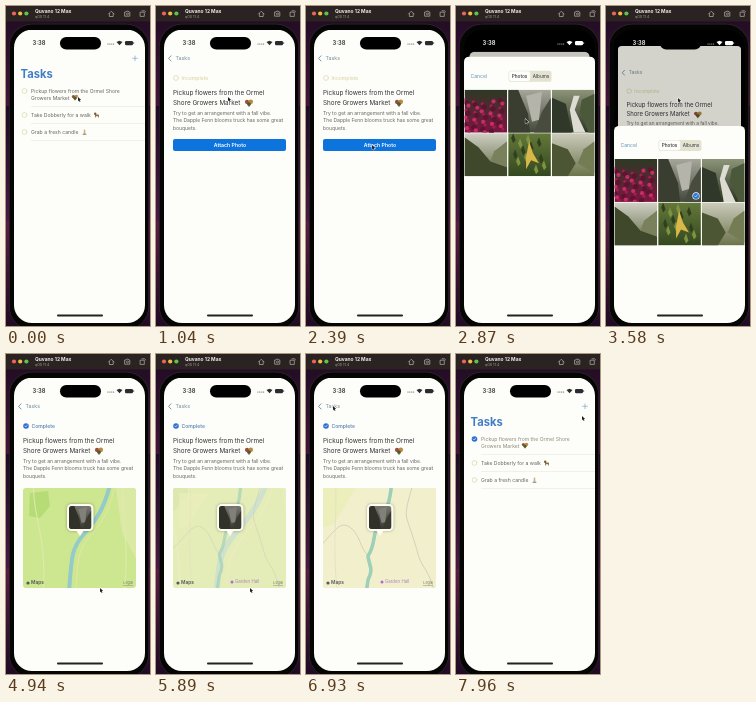
Recreate the animation shown at these times as an HTML page with a canvas. Size 144 by 320 pixels, loop 8 s.

```html
<!DOCTYPE html>
<html lang="en">
<head>
<meta charset="utf-8">
<style>
html, body { margin: 0; width: 100%; height: 100%; overflow: hidden; background: #000; }
canvas { display: block; width: 144px; height: 320px; }
</style>
</head>
<body>
<canvas></canvas>
<script>
const LOOP = 8000;
const PAPER = '#fdfdf9', BLUE = '#0c74dc', PALE = '#d4d29c', INK = '#34343a', GREY = '#66665e';
const canvas = document.querySelector('canvas');
const c = canvas.getContext('2d');
const dpr = window.devicePixelRatio || 1;
canvas.width = 144 * dpr;
canvas.height = 320 * dpr;

const clamp = x => Math.max(0, Math.min(1, x));
const mix = (a, b, k) => a + (b - a) * k;
const easeOut = x => 1 - (1 - clamp(x)) ** 3;
const smooth = x => (x = clamp(x), x * x * (3 - 2 * x));

function group(draw) { c.save(); draw(); c.restore(); }
function path(x, y, w, h, r = 0) { c.beginPath(); c.roundRect(x, y, w, h, r); }
function box(x, y, w, h, color, r) { path(x, y, w, h, r); c.fillStyle = color; c.fill(); }
function dot(x, y, r, color) { c.beginPath(); c.arc(x, y, r, 0, 7); c.fillStyle = color; c.fill(); }
function ring(x, y, r, color) { c.beginPath(); c.arc(x, y, r, 0, 7); c.strokeStyle = color; c.lineWidth = .6; c.stroke(); }
function poly(points, color) {
  c.beginPath();
  points.forEach(p => c.lineTo(...p));
  c.fillStyle = color;
  c.fill();
}
function stroke(d, color, width) {
  c.strokeStyle = color;
  c.lineWidth = width;
  c.lineCap = c.lineJoin = 'round';
  c.stroke(new Path2D(d));
}
function text(s, x, y, size, color, weight = 400, align = 'left') {
  c.font = `${weight} ${size}px Inter, sans-serif`;
  c.textAlign = align;
  c.textBaseline = 'middle';
  c.fillStyle = color;
  c.fillText(s, x, y);
}
function fade(x, y, w, h, top, bottom) {
  const g = c.createLinearGradient(0, y, 0, y + h);
  g.addColorStop(0, top);
  g.addColorStop(1, bottom);
  c.fillStyle = g;
  c.fillRect(x, y, w, h);
}

function bouquet(x, y, size) {
  group(() => {
    c.translate(x, y);
    c.scale(size, size);
    poly([[-2, 0], [2, 0], [0, 3]], '#8a7a4c');
    dot(-1.4, -.8, 1.5, '#a04a40');
    dot(1.3, -.9, 1.6, '#b88c3c');
    dot(0, .7, 1.3, '#4c5c34');
  });
}
function dog(x, y) {
  box(x - 2, y - .6, 4, 1.8, '#8c6c44', .8);
  box(x - 1.8, y + .6, .8, 2, '#8c6c44');
  box(x + 1, y + .6, .8, 2, '#8c6c44');
  dot(x - 1.8, y - 1.2, 1.2, '#74583a');
}
function candle(x, y) {
  box(x - .8, y - 1, 1.6, 3, '#bcb49c');
  dot(x, y - 1.8, .8, '#dca03c');
  box(x - 2, y + 1.8, 4, .9, '#8c7c5c', .4);
}
function check(x, y, done) {
  if (!done) return ring(x, y, 2.4, PALE);
  dot(x, y, 2.8, '#2f6fd0');
  stroke(`M${x - 1.2} ${y}l.9 1 1.6-2`, '#fff', .6);
}

function listPage(done) {
  box(8, 24, 131, 293, PAPER);
  stroke('M129 50v4.6M126.7 52.3h4.6', '#6c96c4', .6);
  text('Tasks', 14.5, 68.5, 11.2, '#3e7ec4', 700);
  check(18.5, 85, done);
  const first = done ? '#8c8a78' : GREY;
  text('Pickup flowers from the Ormel Shore', 25, 85, 5.1, first);
  text('Growers Market', 25, 92, 5.1, first);
  bouquet(69, 91.5, 1.1);
  check(18.5, 109, false);
  text('Take Dobberly for a walk', 25, 109, 5.1, GREY);
  dog(91, 109);
  check(18.5, 126, false);
  text('Grab a fresh candle', 25, 126, 5.1, GREY);
  candle(78.5, 126);
  for (const y of [100, 117.5, 134.5]) box(25, y, 114, .4, '#e8e6d2');
}

function photo(kind, x, y, w, h) {
  group(() => {
    path(x, y, w, h);
    c.clip();
    c.translate(x, y);
    c.scale(w / 43, h / 43);
    [
      () => {
        fade(0, 0, 43, 43, '#2c3a24', '#7c1440');
        for (let i = 0; i < 46; i++)
          dot(i * 17.3 % 43, 10 + i * 11.7 % 33, 1.6 + i % 3 * .5, ['#a81c50', '#c82c68', '#5c1430'][i % 3]);
      },
      () => {
        fade(0, 0, 43, 43, '#a6a69a', '#44483c');
        poly([[0, 0], [10, 0], [20, 24], [22, 43], [0, 43]], '#3a3e30');
        poly([[18, 6], [34, 2], [31, 30], [24, 32]], '#b4b4aa');
        poly([[43, 8], [34, 22], [26, 43], [43, 43]], '#484c3e');
      },
      () => {
        fade(0, 0, 43, 43, '#8c9478', '#2c3424');
        poly([[0, 8], [14, 14], [20, 43], [0, 43]], '#30382a');
        poly([[22, 6], [28, 6], [23, 20], [34, 43], [22, 43], [18, 20]], '#dcdcd2');
        poly([[30, 10], [43, 4], [43, 43], [37, 43], [28, 22]], '#4c583a');
      },
      () => {
        fade(0, 0, 43, 43, '#d0d0c4', '#5c6640');
        poly([[0, 4], [14, 14], [26, 28], [43, 34], [43, 43], [0, 43]], '#40482c');
        poly([[43, 8], [30, 18], [26, 28], [43, 34]], '#78805c');
      },
      () => {
        fade(0, 0, 43, 43, '#64783a', '#344820');
        for (let i = 0; i < 12; i++) {
          const px = 5 + i * 13 % 34, py = 5 + i * 19 % 34;
          poly([[px, py - 5], [px + 2.5, py + 2], [px, py + 5], [px - 2, py]], i % 2 ? '#7e9440' : '#2e4020');
        }
        poly([[21, 8], [25, 20], [31, 30], [23, 27], [18, 36], [18, 24]], '#d8b848');
      },
      () => {
        fade(0, 0, 43, 43, '#ccccbc', '#6c744c');
        poly([[0, 10], [16, 16], [24, 30], [16, 43], [0, 43]], '#4c5634');
        poly([[43, 8], [32, 16], [26, 30], [43, 40]], '#747c54');
      }
    ][kind]();
  });
}

// River and roads are laid out around the pin, which stays put while zooming.
function map(zoom) {
  group(() => {
    path(17, 134, 113, 100, 3);
    c.clip();
    const layer = (alpha, scale, draw) => group(() => {
      c.globalAlpha = alpha;
      c.translate(74, 182);
      c.scale(scale, scale);
      c.translate(-74, -182);
      draw();
    });
    layer(1, 1 + zoom * .6, () => {
      box(-20, 90, 200, 190, '#cde690');
      poly([[24, 139], [42, 137], [44, 152], [34, 164], [23, 162]], '#b6dc78');
      poly([[110, 134], [130, 134], [130, 205], [116, 178]], '#daeaa4');
      stroke('M28 120C24 165 44 180 36 250M118 120C112 160 127 190 116 250', '#e0eaae', 1);
      stroke('M107 118C100 152 92 164 78 180S66 204 62 250', '#94cac8', 4);
      stroke('M111 120C105 155 98 166 84 182S72 210 69 250', '#e6e6a8', .9);
    });
    if (zoom) layer(zoom, .7 + zoom * .3, () => {
      box(-30, 80, 220, 210, '#f2f0cc');
      poly([[17, 134], [50, 134], [28, 170], [17, 174]], '#eceebc');
      stroke('M112 110C105 140 98 155 101 165S108 185 112 200 124 215 130 245M5 199C22 190 30 166 42 172S54 196 62 201', '#c6c3b0', .7);
      stroke('M28 110C34 160 23 190 34 255', '#e0dcc0', .7);
      stroke('M86 110C87 150 78 160 72 171S70 190 62 202C63 212 68 214 62 226L58 255', '#9ed0b8', 3.6);
    });
    if (zoom > .5) {
      dot(76, 228, 1.5, '#b06cc8');
      text('Garden Hall', 79, 228, 4.4, '#b080bc');
    }
    dot(22, 229, 1.6, '#55585a');
    text('Maps', 25, 229, 4.8, '#55585a', 600);
    text('Legal', 127, 229, 3.8, '#7c7e70', 400, 'right');
    box(117, 231, 10, .4, '#8c8e7c');
  });
  group(() => {
    c.shadowColor = '#0005';
    c.shadowBlur = 3 * dpr;
    box(61, 150, 26.5, 27, '#fffdf2', 4.5);
  });
  poly([[70, 176], [78, 176], [74, 182]], '#fffdf2');
  group(() => {
    path(63, 152, 22.5, 23, 3);
    c.clip();
    photo(1, 63, 152, 22.5, 23);
    box(63, 152, 22.5, 23, '#1c181855');
  });
}

function detailPage(done, zoom) {
  box(8, 24, 131, 293, PAPER);
  stroke('M15 49.8l-2.4 2.6 2.4 2.6', '#5c7c9c', .8);
  text('Tasks', 19.5, 52.5, 5.3, '#7a8e9c');
  check(20, 72, done);
  text(done ? 'Complete' : 'Incomplete', 25.5, 72, 5.1, done ? '#4c7cac' : PALE, done ? 500 : 400);
  text('Pickup flowers from the Ormel', 17, 87.3, 6.35, INK);
  text('Shore Growers Market', 17, 97, 6.35, INK);
  bouquet(93, 97, 1.4);
  text('Try to get an arrangement with a fall vibe.', 17, 107, 5, GREY);
  text('The Dapple Fenn blooms truck has some great', 17, 114.5, 5, GREY);
  text('bouquets.', 17, 122, 5, GREY);
  if (done) return map(zoom);
  box(17, 133, 113, 12, BLUE, 2);
  text('Attach Photo', 74, 139.2, 5.2, '#fff', 600, 'center');
}

function sheet(top, picked) {
  group(() => {
    c.translate(0, top);
    box(8, 0, 131, 300, PAPER, [5, 5, 0, 0]);
    text('Cancel', 14.5, 19.5, 5.1, '#5c94bc');
    box(52.5, 14, 43, 11, '#e4e3d2', 2.5);
    box(53.2, 14.7, 21, 9.6, PAPER, 2);
    text('Photos', 63.5, 19.6, 4.7, INK, 500, 'center');
    text('Albums', 85, 19.6, 4.7, INK, 400, 'center');
    for (let i = 0; i < 6; i++) photo(i, 8.5 + i % 3 * 43.7, i < 3 ? 33 : 76.5, 42.7, 43);
    if (picked) {
      dot(90, 70, 3.6, '#fff');
      dot(90, 70, 3, '#2a74d4');
      stroke('M88.7 70l1 1.1 1.7-2.2', '#fff', .6);
    }
  });
}

function statusBar(color) {
  text('3:38', 33, 37.3, 5.8, color, 600, 'center');
  for (let i = 0; i < 4; i++) dot(102 + i * 1.9, 38, .5, color);
  poly([[110.5, 36], [113.5, 34.8], [116.5, 36], [113.5, 39.3]], color);
  box(119, 35, 8, 4.2, color, 1.2);
  box(127.4, 36.3, .7, 1.6, color);
  box(54, 31, 41, 12.5, '#000', 6.3);
}

function chrome() {
  fade(0, 0, 144, 100, '#1c0c20', '#48123e');
  fade(0, 100, 144, 115, '#1e0a26', '#4c1846');
  fade(0, 215, 144, 105, '#5c1c40', '#200a24');
  box(0, 0, 144, 15.5, '#2a2322');
  ['#ee6459', '#f2bb40', '#5dc250'].forEach((color, i) => dot(8 + i * 6.2, 7.5, 2.1, color));
  text('Quvano 12 Max', 29, 6, 4.9, '#efece6', 700);
  text('qOS 11.4', 29, 11.3, 3.5, '#a8a29c');
  stroke('M102.5 8l2.8-2.8 2.8 2.8M103.4 7.5v3h3.8v-3', '#b8b2ac', .7);
  stroke('M119 6h1l.6-.9h1.6l.6.9h1v4.2h-4.8z', '#b8b2ac', .7);
  ring(121.4, 8, 1, '#b8b2ac');
  stroke('M134.5 6.2h3.8v4.2h-3.8zM136 4.8h2.6l1 1', '#b8b2ac', .7);
  box(3, 17.8, 140, 306, '#2e282c', 23);
  box(3.7, 18.5, 138.6, 304.6, '#050504', 22);
}

const cursorStops = [[0, 72, 91], [1450, 72, 91], [2150, 66, 139], [2550, 66, 139], [3150, 72, 92],
  [3900, 72, 92], [4700, 94, 234], [5900, 94, 234], [6750, 27, 52], [7200, 27, 52], [7850, 126, 62], [LOOP, 126, 62]];
function cursor(t) {
  const i = cursorStops.findIndex(s => s[0] > t);
  const [a, b] = [cursorStops[i - 1], cursorStops[i]];
  const k = smooth((t - a[0]) / (b[0] - a[0]));
  const arrow = 'M0 0v4.3l1-.9.7 1.6.8-.4-.7-1.5h1.4z';
  group(() => {
    c.translate(mix(a[1], b[1], k), mix(a[2], b[2], k));
    stroke(arrow, '#fff', .7);
    c.fillStyle = '#222';
    c.fill(new Path2D(arrow));
  });
}

function render(t) {
  c.setTransform(dpr, 0, 0, dpr, 0, 0);
  chrome();
  const push = easeOut((t - 400) / 500) - easeOut((t - 7030) / 500);
  const raised = easeOut((t - 2490) / 500) - easeOut((t - 3531) / 500);
  const done = t > 3980;
  group(() => {
    path(8, 23.7, 131, 293.3, 18);
    c.clip();
    if (push < 1) group(() => {
      c.translate(-39 * push, 0);
      listPage(done);
    });
    if (push > 0) group(() => {
      const scale = 1 - .082 * raised;
      c.translate(73.5 + 131 * (1 - push), 24 + 22 * raised);
      c.scale(scale, scale);
      c.translate(-73.5, -24);
      if (raised) {
        box(-10, -10, 170, 340, '#000');
        path(8, 24, 131, 293, 6 * raised);
        c.clip();
      }
      detailPage(done, smooth((t - 5350) / 900));
      if (raised) box(8, 24, 131, 293, `rgba(20,20,0,${.25 * raised})`);
    });
    if (raised) sheet(316 - 269 * raised, t > 3450);
    statusBar(raised > .4 ? '#fff' : '#2c2c30');
    box(51, 308.6, 46, 1.8, '#222', .9);
  });
  cursor(t);
}

function tick() {
  render(performance.now() % LOOP);
  requestAnimationFrame(tick);
}
tick();
</script>
</body>
</html>
```
